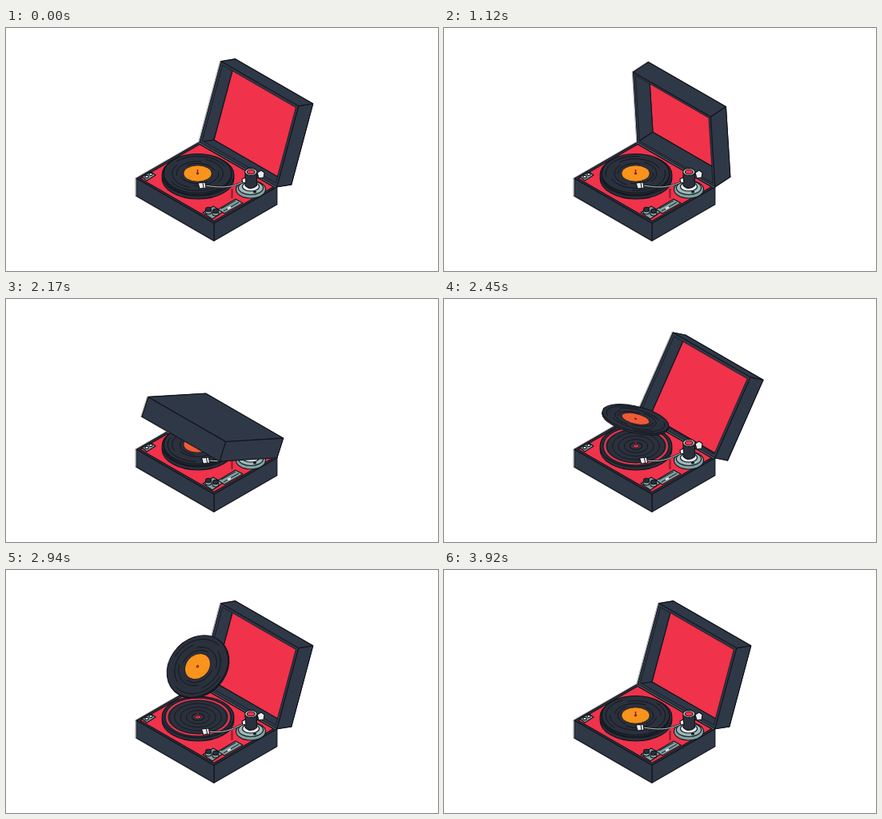
Animation, 540 px wide and 304 px high, one loop 3990 ms. Source, as an HTML page with a canvas:

```html
<!DOCTYPE html>
<html>
<head>
<meta charset="utf-8">
<style>
html, body { margin: 0; width: 100%; height: 100%; overflow: hidden; background: #fff; }
canvas { display: block; }
</style>
</head>
<body>
<canvas id="stage" width="540" height="304"></canvas>
<script>
const ctx = document.getElementById('stage').getContext('2d');
const LOOP = 3990, STEP = 70, OPEN = 110;
const NAVY = '#2f3847', RED = '#f0324b', VINYL = '#2a303c', INK = '#11141a',
      ORANGE = '#f8931d', CORAL = '#f05a36', TEAL = '#7f9fa0', PALE = '#e8ebeb',
      SHADE = '#a9a9a9', WINE = '#8f1d2c';

// Isometric unit axes: along the hinge, towards the viewer's left, up
const A = [.866, .5], V = [-.866, .5], UP = [0, -1];
const WIDTH = 111.8, DEPTH = 91, HEIGHT = 22;
const HINGE = [242, 142.8], BASE = [242, 164.8];
const FACES = ['001 101 111 011', '111 101 100 110', '011 111 110 010',
               '001 011 010 000', '101 001 000 100'];

const clamp = x => Math.min(1, Math.max(0, x));
const span = (t, from, to) => clamp((t - from) / (to - from));
const smooth = x => x * x * (3 - 2 * x);
const mix = (p, q, s, k) => p.map((x, i) => x * s + q[i] * k);
const tilt = deg => {
  const c = Math.cos(deg * Math.PI / 180), s = Math.sin(deg * Math.PI / 180);
  return { w: mix(V, UP, c, s), n: mix(UP, V, c, -s) };
};

function paint(fill, stroke = INK, width = 1.1) {
  if (fill) { ctx.fillStyle = fill; ctx.fill('evenodd'); }
  if (stroke) { ctx.strokeStyle = stroke; ctx.lineWidth = width; ctx.stroke(); }
}
function poly(points, fill, stroke, width) {
  ctx.beginPath();
  points.forEach(p => ctx.lineTo(...p));
  if (fill) ctx.closePath();
  paint(fill, stroke, width);
}
function oval(x, y, rx, ry, fill, stroke, width) {
  ctx.beginPath();
  ctx.ellipse(x, y, rx, ry, 0, 0, 7);
  paint(fill, stroke, width);
}
// Circle or arc lying in the plane spanned by A and w
function disc(c, r, w, fill, stroke, width, from = 0, to = 2 * Math.PI) {
  ctx.save();
  ctx.transform(A[0], A[1], w[0], w[1], c[0], c[1]);
  ctx.beginPath();
  ctx.arc(0, 0, r, from, to);
  ctx.restore();
  paint(fill, stroke, width);
}

// Rectangle in the plane of A and w, set in from the box edges
function inset(origin, w, margin) {
  const x = WIDTH - margin, y = DEPTH - margin;
  return [[margin, margin], [x, margin], [x, y], [margin, y]].map(([i, j]) =>
    origin.map((o, d) => o + A[d] * i + w[d] * j));
}
function boxFaces(origin, angle) {
  const { w, n } = tilt(angle);
  return FACES.map((face, id) => {
    const points = face.split(' ').map(([i, j, k]) =>
      origin.map((o, d) => o + A[d] * WIDTH * i + w[d] * DEPTH * j + n[d] * HEIGHT * k));
    const [p, q, , s] = points;
    const outer = (q[0] - p[0]) * (s[1] - p[1]) - (q[1] - p[1]) * (s[0] - p[0]) > 0;
    return { id, points, outer };
  });
}
// Pale fringe on the left-hand side of a box
function fringe(faces) {
  ctx.save();
  ctx.translate(-1.3, -.3);
  faces.forEach(f => poly(f.points, null, SHADE));
  ctx.restore();
}

function lidAngle(t) {
  if (t < 2140) return OPEN * (1 - span(t, 910, 1360) ** 2);
  const u = span(t, 2140, 2795) - 1, back = 2.1;
  return OPEN * (1 + (back + 1) * u ** 3 + back * u * u);
}

function drawBase() {
  const faces = boxFaces(BASE, 0);
  fringe(faces);
  faces.filter(f => f.outer).forEach(f => poly(f.points, NAVY));
  poly(inset(HINGE, V, 2.6), RED);
}

function drawLidInside(faces, angle) {
  fringe(faces);
  faces.filter(f => !f.outer).forEach(f => poly(f.points, f.id ? NAVY : RED));
  if (faces[0].outer) return;
  const { w } = tilt(angle);
  ctx.beginPath();
  for (const margin of [0, 3]) {
    inset(HINGE, w, margin).forEach((p, i) => i ? ctx.lineTo(...p) : ctx.moveTo(...p));
    ctx.closePath();
  }
  paint(NAVY, INK, .7);
}

function drawPlatter() {
  const top = [240, 184];
  disc([240, 188], 36.7, V, VINYL);
  disc(top, 36.7, V, VINYL);
  disc(top, 31.8, V, null, RED, 2.2);
  for (const r of [34, 29.5, 24, 18, 12]) disc(top, r, V, null, INK, .8);
  disc(top, 6, V, '#343b48');
  disc(top, 3, V, RED, INK, .8);
  poly([[239.5, 178], [239.5, 184]], null, WINE, 1.5);
}

function drawRecord(t) {
  const turn = smooth(span(t, 2260, 3220)), angle = 180 * turn;
  const { w, n } = tilt(angle);
  const c = [239.5, 182 - 102 * Math.sin(Math.PI * turn)];
  const side = angle < 45 ? 1 : -1;
  const label = t > 1400 && side > 0 ? CORAL : ORANGE;
  const spin = t / LOOP * 6 * Math.PI;
  disc(mix(c, n, 1, -2 * side), 34.6, w, VINYL);
  disc(c, 34.6, w, VINYL);
  [30.5, 26, 21.5, 18].forEach((r, i) => {
    for (let k = 0; k < 2; k++) {
      const start = spin + i * 1.1 + k * Math.PI;
      disc(c, r, w, null, INK, .9, start, start + 1.9);
    }
  });
  disc(c, 14.4, w, label, INK, .8);
  disc(c, 1.2, w, RED, INK, .7);
  if (turn === 0 || turn === 1) poly([[239.5, 177], [239.5, 183]], null, WINE, 1.5);
}

function drawControls() {
  poly([[170, 186], [181, 180], [187, 184], [176, 191]], TEAL);
  oval(176, 186, 2.2, 1.6, PALE);
  oval(181, 183, 2, 1.6, PALE);

  poly([[246, 231], [259, 223], [271, 230], [258, 239]], TEAL);
  for (const [x, y] of [[253, 227], [262, 229]]) {
    oval(x, y + 3, 4, 3, TEAL);
    oval(x, y, 3.4, 2.7, VINYL);
  }
  poly([[265, 227], [287, 214], [296, 219], [273, 232]], TEAL);
  poly([[269, 226], [287, 216]], null, INK, 1);
  poly([[272, 229], [291, 218]], null, INK, 1);
  poly([[277, 226], [281, 224]], null, PALE, 2);
}

function drawArm(t) {
  const rest = t < 1400 ? 0 : 1 - smooth(span(t, 3220, 3570));
  const x = 245 + 4.5 * rest, y = 197 + 5 * rest;
  oval(306, 202, 18.5, 11, TEAL);
  oval(306, 200, 15.5, 8.5, '#9cbab9');
  oval(306, 198.5, 10.5, 5.5, PALE);
  oval(311, 205, 1.5, 1, VINYL);
  poly([[282.5, 201], [282.5, 213]], null, WINE, 2.2);

  ctx.beginPath();
  ctx.moveTo(x + 4, y);
  ctx.bezierCurveTo(x + 20, y + 2, 278, 202, 300, 191);
  paint(null, INK, 2.4);
  paint(null, '#c8cccc', 1);

  ctx.beginPath();
  ctx.moveTo(299, 180);
  ctx.lineTo(299, 197);
  ctx.quadraticCurveTo(306, 204, 313.5, 197);
  ctx.lineTo(313.5, 180);
  paint(VINYL);
  oval(306.2, 180, 7.4, 4.6, PALE);
  oval(306.2, 180, 5, 3, RED);
  poly([[314, 181], [319, 178], [323, 181], [322, 187], [316, 188]], PALE);
  poly([[295, 189], [299, 187], [300, 193], [296, 194]], PALE);

  poly([[x - 5, y - 3], [x + 4, y - 4], [x + 5, y + 3], [x - 3, y + 4]], PALE);
  poly([[x + 1, y - 3], [x + 2, y + 3]], null, INK, 1);
}

function draw(t) {
  ctx.fillStyle = '#fff';
  ctx.fillRect(0, 0, 540, 304);
  ctx.lineJoin = 'round';
  const angle = lidAngle(t), lid = boxFaces(HINGE, angle);
  drawBase();
  drawLidInside(lid, angle);
  drawPlatter();
  drawControls();
  drawRecord(t);
  drawArm(t);
  lid.filter(f => f.outer).forEach(f => poly(f.points, NAVY));
}

function tick() {
  draw(Math.floor(performance.now() % LOOP / STEP) * STEP);
  requestAnimationFrame(tick);
}
tick();
</script>
</body>
</html>
```
